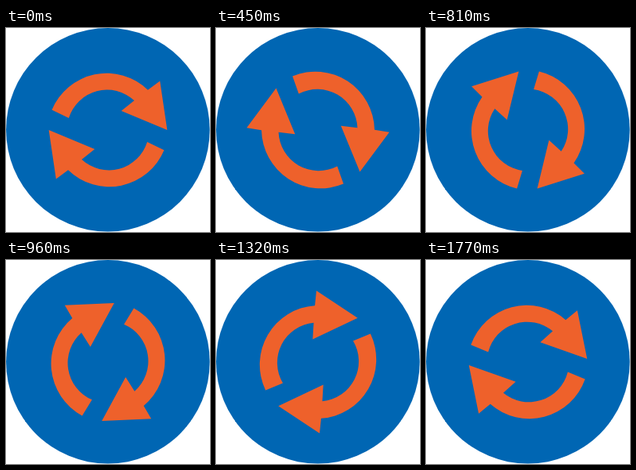
Recreate the animation shown at these times as an HTML page. Size 256 px wide and 256 px high, loop 1800 ms.

```html
<!DOCTYPE html>
<html lang="en">
<head>
<meta charset="utf-8">
<title>Refresh</title>
<style>
  html, body { margin: 0; width: 100%; height: 100%; overflow: hidden; background: #fff; }
  svg { display: block; width: 100vw; height: 100vh; }
</style>
</head>
<body>
<svg viewBox="0 0 256 256">
  <defs>
    <!-- One arrow around the origin, pointing right -->
    <path id="arrow" d="M-70.4 -25.2 A74.3 74.3 0 0 1 50 -50.3 L65.2 -61.4 L74.3 0 L16.7 -24 L33 -37 A50.3 50.3 0 0 0 -49.2 -15 Z"/>
  </defs>
  <circle cx="127.9" cy="127.8" r="127.8" fill="#0066b3"/>
  <g id="arrows" fill="#ee612b">
    <use href="#arrow"/>
    <use href="#arrow" transform="rotate(180)"/>
  </g>
</svg>
<script>
  const LOOP = 1800;
  const STEP = 30;
  const DEGREES_PER_STEP = 180 * STEP / LOOP;
  const arrows = document.getElementById('arrows');
  const start = performance.now();

  // The pair looks the same after half a turn, so one loop covers 180 degrees.
  function render(time) {
    const step = Math.floor((time % LOOP) / STEP);
    arrows.setAttribute('transform', `translate(128 128) rotate(${step * DEGREES_PER_STEP})`);
  }

  function tick() {
    render(performance.now() - start);
    requestAnimationFrame(tick);
  }

  render(0);
  requestAnimationFrame(tick);
</script>
</body>
</html>
```
